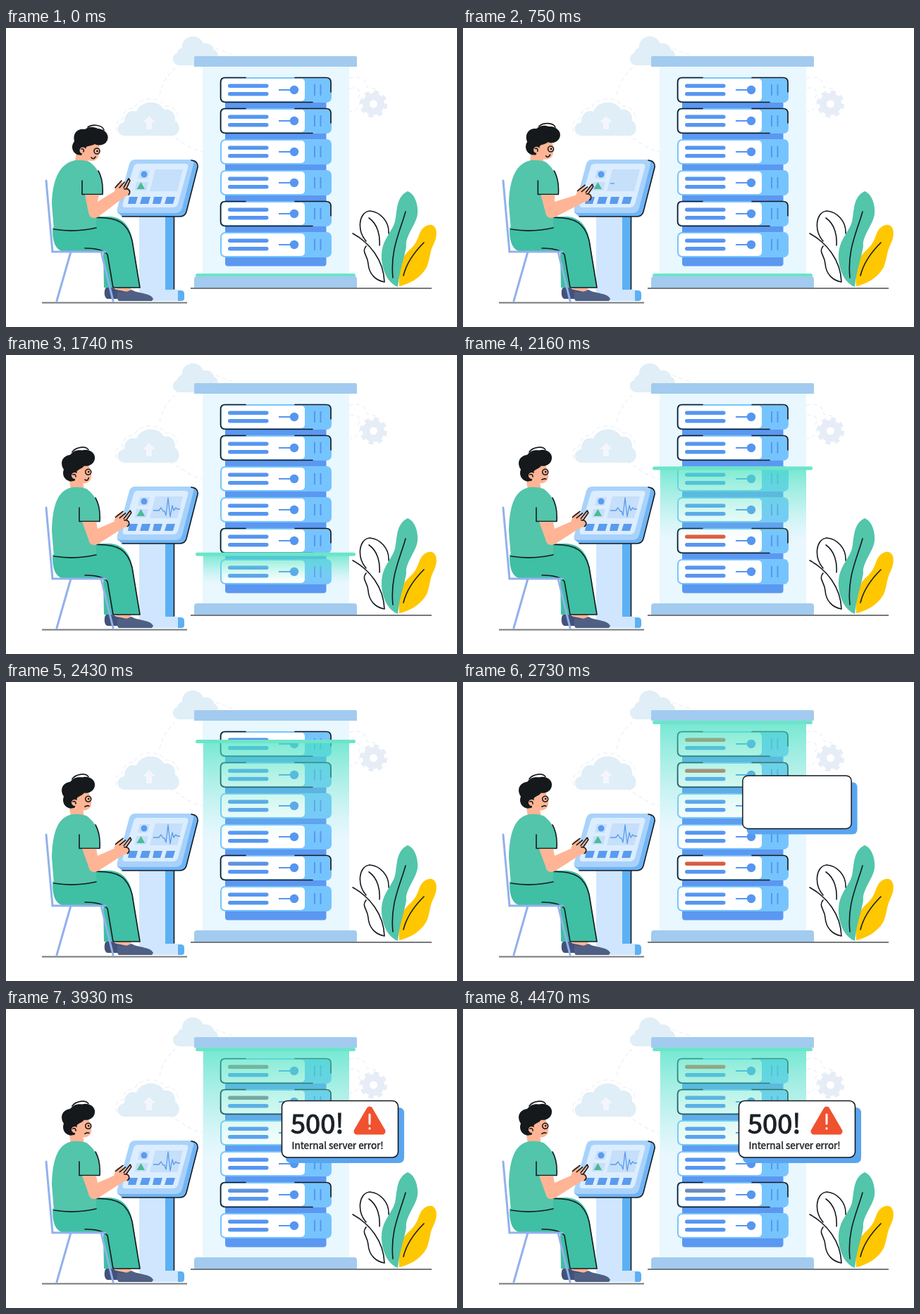
Animation of 640 by 425 pixels, one loop 4.5 s. Source, as an HTML page:

```html
<!DOCTYPE html>
<html lang="en">
<head>
<meta charset="utf-8">
<title>Server error</title>
<style>
  html, body { margin: 0; width: 100%; height: 100%; overflow: hidden; background: #fff; }
  svg { display: block; width: 100vw; height: 100vh; }
  text { font-family: "Noto Sans CJK JP", "Noto Sans CJK SC", "Noto Sans CJK", "Noto Sans", sans-serif; font-weight: 500; fill: #1b2126; stroke: #1b2126; }
  .ink { fill: none; stroke: #15191f; stroke-width: 1.6; stroke-linecap: round; stroke-linejoin: round; }
  .faint { fill: none; stroke: #eceff7; stroke-width: 1.2; stroke-dasharray: 6 4; }
  .chair { fill: none; stroke: #92b1ec; stroke-width: 3; stroke-linecap: round; stroke-linejoin: round; }
  .skin { fill: #ffb595; }
</style>
</head>
<body>
<svg viewBox="0 0 640 425">
  <defs>
    <linearGradient id="glow" x2="0" y2="1">
      <stop offset="0" stop-color="#45e2c0" stop-opacity=".7"/>
      <stop offset=".5" stop-color="#62e6ca" stop-opacity=".35"/>
      <stop offset="1" stop-color="#8aeedb" stop-opacity="0"/>
    </linearGradient>
  </defs>

  <g id="sky">
    <path fill="#dfeef7" d="M246 53C235 52 234 38 243 36C244 31 247 29 250 28C249 10 273 6 280 22C289 21 294 25 295 31C301 33 303 40 299 53Z"/>
    <path fill="#dfeef7" d="M168 153C156 152 155 136 168 134C168 120 178 116 185 119C190 103 217 101 224 116C234 114 241 121 240 132C248 136 248 152 237 153Z"/>
    <path fill="#f5f6fd" d="M203 125L212 134H207V144H199V134H194Z"/>
    <path class="faint" d="M157 147C154 137 158 130 166 129C166 119 172 114 182 114C188 98 217 96 226 111C238 110 245 120 244 128M218 95C221 80 228 68 240 57M232 152C245 157 260 173 280 176M288 25C300 30 308 33 322 38M487 72C500 66 512 74 512 84L525 87M488 86C500 82 505 92 500 98C506 106 500 118 488 119"/>
    <circle cx="521.500" cy="108" r="10.500" fill="none" stroke="#e6edf7" stroke-width="10"/>
    <circle cx="521.500" cy="108" r="17" fill="none" stroke="#e6edf7" stroke-width="5" stroke-dasharray="7 6.350"/>
  </g>

  <g fill="none" stroke="#75787d" stroke-width="2"><path d="M51 390.500H257M262 370H604"/></g>

  <g id="plant">
    <path fill="#ffc700" d="M604 280C612 282 613 295 607 307C601 318 602 328 597 340C588 356 572 364 558 367C556 345 560 328 570 318C582 308 584 300 587 292C591 283 598 279 604 280Z"/>
    <path fill="#52c5ab" d="M570 232C580 236 585 250 584 264C583 278 566 296 568 310C566 325 558 345 556 368C540 362 532 340 533 322C534 300 548 290 552 275C555 262 553 240 570 232Z"/>
    <path class="ink" d="M567 261C559 290 545 315 549 355M593 305C580 318 568 335 564 352M511 303C498 288 500 262 516 260C531 261 544 275 543 292M515 270C528 279 531 296 530 309M492 292C516 305 536 330 537 361M511 310C504 319 513 322 514 335C515 350 525 359 537 361"/>
  </g>

  <rect x="279" y="54" width="208" height="300" fill="#e9f7fe"/>
  <rect x="311" y="98" width="143.500" height="240.500" rx="4" fill="#5b98f1"/>
  <g id="rack"></g>
  <g id="scan">
    <rect id="veil" x="280" width="207" fill="url(#glow)"/>
    <rect id="beam" x="269" width="227" height="5" rx="2.500" fill="#6be5c8"/>
  </g>
  <path fill="#a2cbef" d="M269 40H496Q498 40 498 42V55H267V42Q267 40 269 40ZM271 353H494Q498 353 498 357V369H267V357Q267 353 271 353Z"/>

  <g id="kiosk">
    <path fill="#5cb0f3" d="M224 266H239V373H248Q253 373 253 378V384Q253 388 249 388H224Z"/>
    <path fill="#cfe6fe" d="M189 266H226V372H244V388H189Z"/>
    <path class="ink" d="M238.500 268V371"/>
    <path fill="#6fb4f5" d="M190 187H263Q273 189 272 198L256 261Q254 268 246 268H165L158 262Z"/>
    <path fill="#a8d2fb" d="M183 187H260Q267 187 266 194L250 256Q248 263 241 263H163Q156 262 158 256L175 193Q177 187 183 187Z"/>
    <path fill="#dbedff" d="M187 193H254Q260 193 258 199L244 250Q242 255 237 255H170Q164 255 166 249L181 198Q182 193 187 193Z"/>
    <path class="ink" d="M263 188Q273 189 272 198L256 261Q254 268 246 268H165"/>
    <path fill="#c6dffa" d="M212 201H251L243 232H204ZM190 202H204L201 214H187ZM185 219H202L199 231H183Z"/>
    <circle cx="196" cy="208" r="4.500" fill="#5a9bee"/>
    <path fill="#4bbb93" d="M191.500 219L197 229H185.500Z"/>
    <path fill="#5a9bee" d="M175 240H187L184 250H173ZM193 240H205L202 250H190ZM210 240H222L219 250H208ZM228 240H240L237 250H225Z"/>
    <path id="pulse" pathLength="1" stroke-dasharray="1 2" fill="none" stroke="#5a9bee" stroke-width="1.300" stroke-linejoin="round" d="M209 221H217L220 217L223 222H225L227 228L230 203L233 230L236 214L238 221L241 217L243 219H247"/>
  </g>

  <path class="chair" d="M57 217L66 318"/>
  <g id="head">
    <path class="skin" d="M106 163L131 162C133 168 134 178 130 185C127 189 121 190 117 188L116 196H97L100 176Z"/>
    <path fill="#15191c" d="M101 180C93 176 92 167 97 161C94 149 102 142 112 144C119 139 126 141 130 143C140 143 147 152 144 159C141 167 132 168 126 165C121 168 117 167 114 169C113 174 108 178 107 181Z"/>
    <path class="ink" d="M116 141C123 136 137 138 139 145"/>
    <circle class="skin" cx="109" cy="174" r="4.500"/>
    <path class="ink" d="M107 172C110 171 111 174 110 176"/>
    <circle class="ink" cx="129" cy="175" r="4"/>
    <circle cx="129.500" cy="175" r="1.300"/>
    <path class="ink" id="mouth"/>
  </g>
  <g id="legs">
    <path class="skin" d="M155 364H178L177 375H157Z"/>
    <path fill="#43527a" d="M141 370C145 367 152 369 157 372L172 375L180 385H144C139 384 139 374 141 370Z"/>
    <path fill="#506084" d="M159 374C165 377 172 375 178 372C188 378 205 376 209 385L207 388H160C157 385 157 379 159 374Z"/>
    <path fill="#3fbfa4" d="M66 284L126 268H148C168 270 177 284 180 304L190 369H139L138 318H84C69 317 66 302 66 284Z"/>
    <path class="ink" d="M129 269.500C160 269 173 278 179 302L190 369H152L144 322C138 315 126 313 112 313"/>
  </g>
  <g id="torso">
    <path fill="#52c5ab" id="shirt"/>
    <path class="ink" id="seams"/>
  </g>
  <path class="skin" id="arm"/>
  <g id="hand">
    <path class="skin" d="M154 232L156 223L163 217L167 224L173 214L176 216L172 227L177 231L175 237L166 241L156 239Z"/>
    <path class="ink" d="M155 227L164 217M161 227L168 219M167 227L174 214L176 217L171 228M168 229C176 227 177 234 174 237"/>
  </g>
  <path class="chair" d="M66 318H141M92 318L72 388M135 318L152 388"/>

  <path id="shadow" fill="#5aa5f0" d="M405 140H557Q565 140 565 148V211Q565 219 557 219H405Q397 219 397 211Z"/>
  <g id="popup">
    <rect x="391.500" y="130.500" width="165" height="80.500" rx="8" fill="#fff" stroke="#15191f" stroke-width="1.600"/>
    <text id="code" x="404" y="176.500" font-size="38" stroke-width="1.100">500!</text>
    <text id="note" x="405.500" y="199" font-size="13.500" stroke-width=".4">Internal server error!</text>
    <g id="warning">
      <path fill="#f0522f" stroke="#f0522f" stroke-width="9" stroke-linejoin="round" d="M516 143L534 174H498Z"/>
      <path stroke="#fff" stroke-width="3" stroke-linecap="round" d="M516 150V163M516 169.500V170"/>
    </g>
  </g>
</svg>
<script>
const LOOP = 4500;
const el = id => document.getElementById(id);
const set = (id, name, value) => el(id).setAttribute(name, value);
const clamp = v => Math.min(1, Math.max(0, v));
const lerp = (a, b, p) => a + (b - a) * p;
const span = (t, a, b) => clamp((t - a) / (b - a));
const smooth = p => p * p * (3 - 2 * p);

// Eased interpolation through [time, value] pairs
function keys(t, list) {
  let i = 1;
  while (i < list.length - 1 && t > list[i][0]) i++;
  const [a, from] = list[i - 1], [b, to] = list[i];
  return lerp(from, to, smooth(span(t, a, b)));
}

// cubic-bezier(x1, 0, x2, 1)
function ease(p, x1, x2) {
  let lo = 0, hi = 1, s;
  for (let i = 0; i < 20; i++) {
    s = (lo + hi) / 2;
    const x = 3 * s * (1 - s) * ((1 - s) * x1 + s * x2) + s ** 3;
    if (x < p) lo = s; else hi = s;
  }
  return smooth(s);
}

const pop = age => keys(age, [[0, 0], [170, 1.066], [300, 0.935], [440, 1.022], [560, 1]]);

function scaleAt(id, s, x, y, angle = 0) {
  set(id, "transform", `translate(${x} ${y}) rotate(${angle}) scale(${s}) translate(${-x} ${-y})`);
}

const BLUE = [86, 150, 240], GREY = [131, 131, 133], RED = [240, 82, 47];
function alarmColour(p) {
  const [a, b, q] = p < 0.25 ? [BLUE, GREY, p / 0.25] : [GREY, RED, (p - 0.25) / 0.75];
  return `rgb(${a.map((v, i) => Math.round(lerp(v, b[i], q)))})`;
}

// Blinking bars: rack slot, start time, period
const alarms = [[0, 2530, 432], [1, 2550, 480], [4, 1940, 500]];

el("rack").innerHTML = [0, 1, 2, 3, 4, 5].map(i => `
  <g transform="translate(0 ${i * 44})">
    <rect x="304" y="70" width="158" height="36" rx="7" fill="#76c4fe"/>
    <rect x="306" y="72" width="118" height="32" rx="5" fill="#fff"/>
    <g fill="#5696f0">
      <rect id="bar${i}" x="315" y="79.500" width="57.500" height="5.500" rx="2.700"/>
      <rect x="315" y="91" width="57.500" height="5.500" rx="2.700"/>
      <circle cx="409" cy="88" r="6.200"/>
      <path stroke="#5696f0" stroke-width="2" d="M387 88H409M438 80V96M446.500 80V96"/>
    </g>
    ${alarms.some(a => a[0] === i) ? '<path class="ink" d="M340 70.500H311Q304.500 70.500 304.500 77V99Q304.500 105.500 311 105.500H435M410 70.500H454Q461 70.500 461 77V91"/>' : ""}
  </g>`).join("");

function drawPerson(t) {
  const nod = smooth(span(t, 540, 1050));
  set("head", "transform", `translate(${-18 * nod} ${-5 * nod}) rotate(${-18 * nod} 120 155)`);
  const sad = smooth(span(t, 1900, 2100));
  set("mouth", "d", `M121 184Q${lerp(124, 125, sad)} ${lerp(188, 183, sad)} 127 ${lerp(183, 185, sad)}`);

  // The back stays on the chair; collar and sleeve follow the lean
  const lean = keys(t, [[0, 0], [360, 3], [1000, -4]]);
  const x = v => v + lean;
  set("shirt", "d", `M${x(98)} 188C${x(78)} 192 66 212 65 250L68 287Q98 291 128 285V237H${x(137)}C${x(138)} 220 ${x(135)} 202 ${x(118)} 190Q${x(108)} 187 ${x(98)} 188Z`);
  set("seams", "d", `M${x(108)} 217V236.500H${x(137)}C${x(138)} 222 ${x(136)} 212 ${x(131)} 203M68 286Q98 291 128 284`);

  const reach = keys(t, [[0, 0], [360, 20], [1000, -1]]);
  const drop = keys(t, [[0, 0], [360, 8], [1000, 5]]);
  const turn = keys(t, [[0, 0], [360, 10]]);
  set("arm", "d", `M${x(112)} 237H${x(132)}L130 247L${156 + reach} ${231 + drop}L${167 + reach} ${241 + drop}L130 269Q119 273 117 262Z`);
  set("hand", "transform", `translate(${reach} ${drop}) rotate(${turn} 164 234)`);
}

function drawScan(t) {
  const travel = 294 * ease(span(t, 1060, 2690), 0.56, 0.69);
  const y = 351.5 - travel;
  set("beam", "y", y - 2.5);
  set("veil", "y", y);
  set("veil", "height", Math.min(travel, travel * 0.5 + 7));
  set("pulse", "stroke-dashoffset", 1 - span(t, 700, 1700));
  for (const [slot, start, period] of alarms) {
    const phase = Math.max(0, t - start) / period % 1;
    set("bar" + slot, "fill", alarmColour(1 - Math.abs(1 - 2 * phase)));
  }
}

function drawPopup(t) {
  const card = pop(t - 2430);
  scaleAt("shadow", card, 481, 179.5);
  scaleAt("popup", card, 474, 171);
  scaleAt("code", pop(t - 2780), 441, 163);
  scaleAt("note", pop(t - 2900), 470, 195);
  const s = pop(t - 3200);
  scaleAt("warning", s, 516, 158.5, s > 0.9 ? (s - 1) * 50 : 0);
}

function frame() {
  const t = performance.now() % LOOP;
  drawPerson(t);
  drawScan(t);
  drawPopup(t);
  requestAnimationFrame(frame);
}
frame();
</script>
</body>
</html>
```
